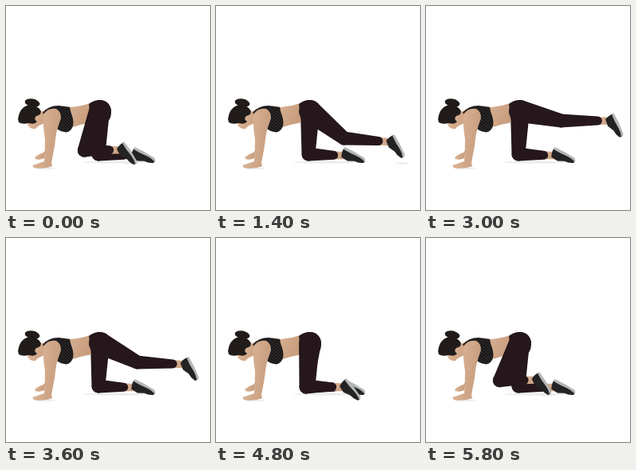
An HTML page that plays this animation: 256x256 px, repeating every 6 s.

```html
<!DOCTYPE html>
<html lang="en">
<head>
<meta charset="utf-8">
<title>Kneeling leg lift</title>
<style>
html, body { margin: 0; width: 100%; height: 100%; overflow: hidden; background: #fff; }
svg { display: block; width: 100vw; height: 100vh; }
.skin { fill: url(#skin); }
.leg { fill: #25171b; }
.dark { fill: #211b19; }
</style>
</head>
<body>
<svg viewBox="0 0 256 256">
  <defs>
    <linearGradient id="skin" x2="1" y2=".3">
      <stop offset="0" stop-color="#e0bb9e"/>
      <stop offset="1" stop-color="#c89d7e"/>
    </linearGradient>
    <pattern id="dots" width="4" height="4" patternUnits="userSpaceOnUse">
      <rect width="4" height="4" fill="#191718"/>
      <circle cx="1" cy="1" r=".5" fill="#6b6463"/>
      <circle cx="3" cy="3" r=".5" fill="#6b6463"/>
    </pattern>
    <g id="shoe">
      <path fill="#242324" d="M0 0H27Q32 1 30 6Q25 9 19 9L11 13L2 12Q-1 6 0 0Z"/>
      <path fill="#b3b7b7" d="M0 -1Q14 -2 28 0Q31 1 30 4Q27 2 19 2Q9 3 0 2Z"/>
    </g>
  </defs>

  <g fill="#ececec">
    <ellipse cx="49" cy="203.500" rx="13" ry="1.500"/>
    <ellipse cx="138" cy="196" rx="42" ry="1.500"/>
    <ellipse id="shadow" cy="197.500" rx="9" ry="1.500"/>
  </g>

  <path class="skin" d="M50 180L48 191Q42 194 37 192L36 190Q42 185 47 184Z"/>
  <g id="rest"></g>

  <path class="skin" d="M60 127Q72 124 82 127Q94 126 106 122L108 146Q96 148 84 152L66 153Z"/>
  <path class="leg" d="M104 123Q110 118 118 118Q131 119 132 133Q132 145 122 149L107 148Q106 136 104 123Z"/>
  <g id="lift"></g>

  <path class="skin" d="M40 136Q46 131 54 128L55 147Q49 145 46 148Q40 150 37 154Q30 155 27 149L32 139Z"/>
  <path fill="url(#dots)" d="M46 134Q53 125 66 125L80 127Q81 133 83 138Q86 147 83 153Q79 160 73 158Q66 157 62 152Z"/>
  <path class="skin" d="M47 136Q53 127 63 129Q69 132 69 141Q65 152 63 160Q61 178 57 197L58 201Q48 205 35 203L33 200Q42 197 48 195Q49 180 49 167Q46 150 47 136Z"/>
  <ellipse class="dark" cx="33" cy="121.500" rx="9.500" ry="5" transform="rotate(12 33 121.500)"/>
  <path class="dark" d="M15 142Q17 128 26 125Q38 122 44 132Q44 137 38 138Q34 142 39 145Q36 149 29 147Q20 149 16 146Z"/>
</svg>
<script>
const LOOP = 6000, STEP = 200, TOP = 2650;
// Half a cycle, from highest lift to tightest tuck; the other half mirrors it
const poses = [
  { at: 0, knee: [170, 142], heel: [236, 133], angle: 64 },
  { at: 1300, knee: [160, 168], heel: [222, 164], angle: 61 },
  { at: 2150, knee: [113, 187], heel: [163, 177], angle: 50 },
  { at: 3000, knee: [88, 177], heel: [137, 167], angle: 58 }
];
const restPose = { knee: [116, 186], heel: [161, 178], angle: 27 };
const hip = [118, 132];
const el = id => document.getElementById(id);
const mix = (a, b, u) => a + (b - a) * u;
const mixPoint = (p, q, u) => p.map((v, i) => mix(v, q[i], u));

// Tapered limb with round ends
function limb(cls, p, r, q, s) {
  const dx = q[0] - p[0], dy = q[1] - p[1], d = Math.hypot(dx, dy);
  const at = ([x, y], k) => `${x - dy / d * k} ${y + dx / d * k}`;
  return `<path class="${cls}" d="M${at(p, r)}A${r} ${r} 0 0 1 ${at(p, -r)}` +
    `L${at(q, -s)}A${s} ${s} 0 0 1 ${at(q, s)}Z"/>`;
}

function leg({ knee, heel, angle }, hipR) {
  const a = angle * Math.PI / 180, c = Math.cos(a), s = Math.sin(a);
  const ankle = [heel[0] + 6 * c - 8 * s, heel[1] + 6 * s + 8 * c];
  const shin = Math.hypot(ankle[0] - knee[0], ankle[1] - knee[1]);
  const cuff = mixPoint(knee, ankle, 1 - 15 / shin);
  return limb("skin", cuff, 5, ankle, 4.5) +
    limb("leg", hip, hipR, knee, 8.5) +
    limb("leg", knee, 8.5, cuff, 5.5) +
    `<use href="#shoe" transform="translate(${heel}) rotate(${angle})"/>`;
}

function poseAt(t) {
  const half = LOOP / 2;
  const d = half - Math.abs(half - Math.abs(t - TOP));
  const i = Math.max(1, poses.findIndex(p => p.at >= d));
  const a = poses[i - 1], b = poses[i];
  const part = (d - a.at) / (b.at - a.at);
  const u = i === 1 ? part * part : part; // slow down at the top
  return {
    knee: mixPoint(a.knee, b.knee, u),
    heel: mixPoint(a.heel, b.heel, u),
    angle: mix(a.angle, b.angle, u)
  };
}

function draw() {
  const t = Math.floor(performance.now() % LOOP / STEP) * STEP;
  const pose = poseAt(t), [x, y] = pose.heel;
  el("lift").innerHTML = leg(pose, 14);
  el("shadow").setAttribute("cx", x + 10);
  el("shadow").setAttribute("opacity", Math.max(0, Math.min(1, (y - 150) / 15)));
  requestAnimationFrame(draw);
}

el("rest").innerHTML = leg(restPose, 12);
draw();
</script>
</body>
</html>
```
